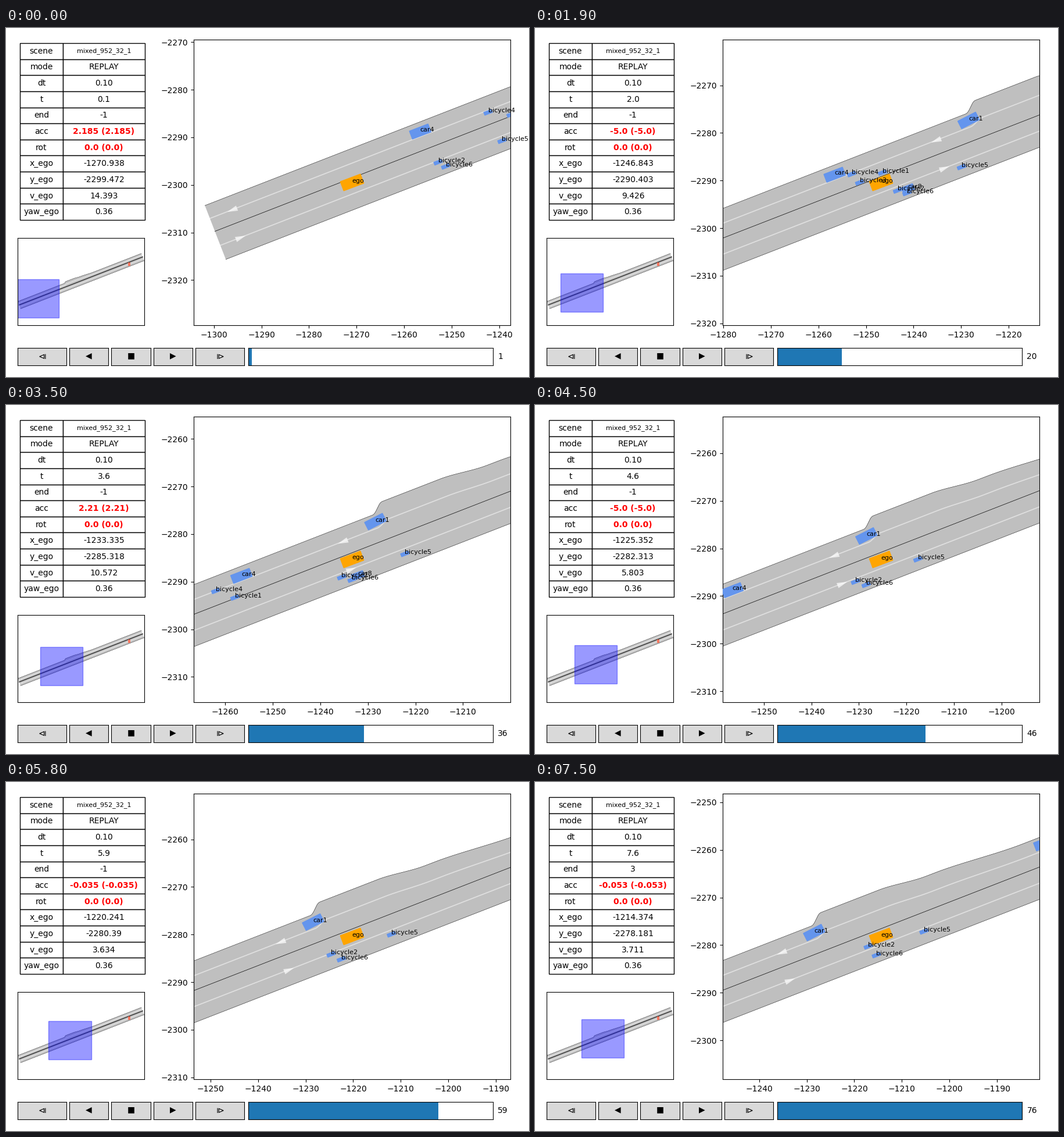
Recreate the animation shown at these times as a matplotlib script. Size 900 px wide and 600 px high, loop 7600 ms.

```python
import matplotlib.pyplot as plt
import numpy as np
from matplotlib.animation import FuncAnimation
from matplotlib.patches import Polygon, Rectangle
from matplotlib.ticker import MultipleLocator

W, H, STEPS, DT = 900, 600, 76, 0.1
YAW = 0.36
HALF_W, HALF_H = 33.3, 30.0

fig = plt.figure(figsize=(W / 100, H / 100), dpi=100, facecolor="white")


def px_axes(x0, y0, x1, y1, **kw):
    """Axes placed by pixel corners, y measured from the top."""
    return fig.add_axes([x0 / W, 1 - y1 / H, (x1 - x0) / W, (y1 - y0) / H], **kw)


# ---------------------------------------------------------------- ego motion
def ego_track():
    """Speed, acceleration and position of the ego car for every step."""
    phases = [(1, 0), (6, 2.185), (1, -2.78), (15, -5),
              (1, -0.06), (12, 2.21), (1, -2.69), (12, -5)]
    drive = 14.393 + DT * np.cumsum([a for count, a in phases for _ in range(count)])
    settle = 3.6375 + 0.447 * np.linspace(1, 0, 9) ** 1.5
    creep = 3.634 + 0.0823 * (1 - np.linspace(1, 0, 17) ** 2)
    v = np.concatenate([drive, settle, creep, [3.711]])
    acc = np.diff(v, prepend=v[0] - 2.185 * DT) / DT
    dist = np.cumsum(v) * DT - v * DT
    return v, acc, -1270.938 + dist * np.cos(YAW), -2299.472 + dist * np.sin(YAW)


v_ego, a_ego, x_ego, y_ego = ego_track()

# ---------------------------------------------------------------- road
ROAD_X, ROAD_Y, ROAD_ANGLE, ROAD_LEN = -1299.78, -2309.74, np.arctan(0.3886), 207.5


def road_xy(s, n):
    """Road coordinates (along, left offset) to map coordinates."""
    s, n = np.broadcast_arrays(s, n)
    c, d = np.cos(ROAD_ANGLE), np.sin(ROAD_ANGLE)
    return ROAD_X + s * c - n * d, ROAD_Y + s * d + n * c


def ramp(s, a, b):
    t = np.clip((s - a) / (b - a), 0, 1)
    return t * t * (3 - 2 * t)


def draw_road(ax, edge_lw, mid_lw):
    s = np.linspace(0, ROAD_LEN, 900)
    left = (5.81 + 1.94 * ramp(s, 78.1, 81.1)
            - 0.9 * ramp(s, 94, 104.5) - 1.04 * ramp(s, 106, 126))
    right = np.full_like(s, -6.33)
    lx, ly = road_xy(s, left)
    rx, ry = road_xy(s, right)
    ax.fill(np.r_[lx, rx[::-1]], np.r_[ly, ry[::-1]], color="#bfbfbf", lw=0, zorder=1)
    for n in (left, right):
        ax.plot(*road_xy(s, n), color="#333333", lw=edge_lw, zorder=1.1)
    for n in (left / 2, right / 2):
        ax.plot(*road_xy(s, n), color="white", lw=1.3, alpha=0.5, zorder=1.2)
    ax.plot(*road_xy(s, 0), color="black", lw=mid_lw, zorder=1.3)
    for start in (3.7, 69):
        for n, tip, base in ((2.85, 0.2, 2.4), (-3.2, 2, -0.2)):
            x, y = road_xy(start + np.array([tip, base, base]),
                           n + np.array([0, 0.57, -0.57]))
            ax.fill(x, y, color="white", alpha=0.7, lw=0, zorder=1.4)


# ---------------------------------------------------------------- main view
main = px_axes(323, 20, 868, 511)
for axis in (main.xaxis, main.yaxis):
    axis.set_major_locator(MultipleLocator(10))
main.ticklabel_format(useOffset=False, style="plain")
draw_road(main, 0.45, 0.5)


def box(x, y, length, width, angle):
    c, s = np.cos(angle), np.sin(angle)
    corners = np.array([[-1, -1], [1, -1], [1, 1], [-1, 1]]) * [length / 2, width / 2]
    return corners @ np.array([[c, s], [-s, c]]) + [x, y]


class Vehicle:
    """A labelled box; drag slows it down, bend curves its path."""

    def __init__(self, name, size, x, y, speed=0, drag=0, slope=0, bend=0,
                 angle=0.365, span=(1, STEPS), color="cornflowerblue", z=3):
        t = DT * np.arange(STEPS)
        dx = speed * t - drag * t ** 3
        self.x = x + dx
        self.y = y + slope * dx + bend * dx ** 2
        self.size, self.angle, self.span = size, angle, span
        self.patch = main.add_patch(Polygon(np.zeros((4, 2)), color=color, lw=1, zorder=z))
        self.label = main.text(0, 0, name, fontsize=8, zorder=6)

    def update(self, frame):
        x, y = self.x[frame], self.y[frame]
        shown = self.span[0] <= frame + 1 <= self.span[1]
        inside = abs(x - x_ego[frame]) <= HALF_W and abs(y - y_ego[frame]) <= HALF_H
        self.patch.set_xy(box(x, y, *self.size, self.angle))
        self.patch.set_visible(shown)
        self.label.set_position((x, y))
        self.label.set_visible(bool(shown and inside))


CAR, BIKE = (4.2, 1.8), (1.7, 0.65)
vehicles = [
    Vehicle("car1", CAR, -1228.43, -2277.38, angle=0.47),
    Vehicle("car4", CAR, -1256.6, -2288.78),
    Vehicle("car5", CAR, -1180.04, -2258.63),
    Vehicle("car8", (2.5, 1.25), -1252.0, -2295.26, speed=5.69, slope=0.33, span=(14, 40)),
    Vehicle("bicycle1", BIKE, -1233.0, -2282.4, speed=-7.14, slope=0.437),
    Vehicle("bicycle2", BIKE, -1252.85, -2295.23, speed=4.995, drag=0.004,
            slope=0.3, bend=0.0033),
    Vehicle("bicycle3", BIKE, -1237.5, -2285.2, speed=-7.29, slope=0.375, span=(1, 30)),
    Vehicle("bicycle4", BIKE, -1242.34, -2284.75, speed=-5.62, slope=0.365),
    Vehicle("bicycle5", BIKE, -1239.41, -2290.71, speed=5.013, drag=0.0084,
            slope=0.365, bend=0.001),
    Vehicle("bicycle6", BIKE, -1251.26, -2296.11, speed=5.213, drag=0.0076,
            slope=0.34, bend=0.0014),
]
ego = Vehicle("ego", (4.5, 2.05), 0, 0, angle=YAW, color="orange", z=4)
ego.x, ego.y = x_ego, y_ego
vehicles.append(ego)

# ---------------------------------------------------------------- overview map
MID_X, MID_Y, MAP_SCALE = -1203.0, -2273.2, 1.1
mini = px_axes(20, 361, 238, 511, xticks=[], yticks=[])
draw_road(mini, 0.35, 0.7)
mini.set_xlim(MID_X - 109 / MAP_SCALE, MID_X + 109 / MAP_SCALE)
mini.set_ylim(MID_Y - 75 / MAP_SCALE, MID_Y + 75 / MAP_SCALE)
mini.add_patch(Rectangle((-1129.5, -2249), 3.6, 6, color="tomato", alpha=0.8, lw=0, zorder=2))
view = mini.add_patch(Rectangle((0, 0), 2 * HALF_W, 2 * HALF_H, color="blue",
                                alpha=0.4, lw=1, zorder=2))

# ---------------------------------------------------------------- info table
panel = px_axes(0, 0, W, H)
panel.set(xlim=(0, W), ylim=(H, 0))
panel.axis("off")
ROWS = ["scene", "mode", "dt", "t", "end", "acc", "rot", "x_ego", "y_ego", "v_ego", "yaw_ego"]
ROW_H, TOP = 27.64, 26
cells = {}
for i, row in enumerate(ROWS):
    y = TOP + i * ROW_H
    for x0, x1 in ((24, 98), (98, 239)):
        panel.add_patch(Rectangle((x0, y), x1 - x0, ROW_H, fc="white", ec="black", lw=1))
    red = row in ("acc", "rot")
    middle = dict(ha="center", va="center")
    panel.text(61, y + ROW_H / 2, row, fontsize=10, **middle)
    cells[row] = panel.text(168.5, y + ROW_H / 2, "", fontsize=8 if row == "scene" else 10,
                            color="red" if red else "black",
                            weight="bold" if red else "normal", **middle)


def table_values(frame):
    acc, x, y, v = (str(round(float(track[frame]), 3))
                    for track in (a_ego, x_ego, y_ego, v_ego))
    return dict(scene="mixed_952_32_1", mode="REPLAY", dt=f"{DT:.2f}",
                t=f"{(frame + 1) * DT:.1f}", end="3" if frame == STEPS - 1 else "-1",
                acc=f"{acc} ({acc})", rot="0.0 (0.0)",
                x_ego=x, y_ego=y, v_ego=v, yaw_ego=str(YAW))


# ---------------------------------------------------------------- player bar
BAR_TOP, BAR_BOTTOM = 550, 580
left = 20
for symbol in "\u29CF\u25C0\u25A0\u25B6\u29D0":
    width = 84.2 if symbol in "\u29CF\u29D0" else 67.2
    button = px_axes(left, BAR_TOP, left + width, BAR_BOTTOM,
                     xticks=[], yticks=[], facecolor="0.85")
    button.text(0.5, 0.5, f"${symbol}$", ha="center", va="center",
                fontsize=10, transform=button.transAxes)
    left += width + 5
slider = px_axes(417, BAR_TOP, 838, BAR_BOTTOM, xticks=[], yticks=[])
slider.set(xlim=(0, STEPS), ylim=(0, 1))
fill = slider.add_patch(Rectangle((0, 0), 1, 1, color="tab:blue", lw=0))
count = slider.text(1.02, 0.5, "", ha="left", va="center", fontsize=10,
                    transform=slider.transAxes)


def update(frame):
    x, y = x_ego[frame], y_ego[frame]
    main.set_xlim(x - HALF_W, x + HALF_W)
    main.set_ylim(y - HALF_H, y + HALF_H)
    view.set_xy((x - HALF_W, y - HALF_H))
    for vehicle in vehicles:
        vehicle.update(frame)
    for row, value in table_values(frame).items():
        cells[row].set_text(value)
    fill.set_width(frame + 1)
    count.set_text(str(frame + 1))
    return []


anim = FuncAnimation(fig, update, frames=STEPS, interval=100, repeat=True,
                     repeat_delay=0, blit=False)
plt.show()
```
